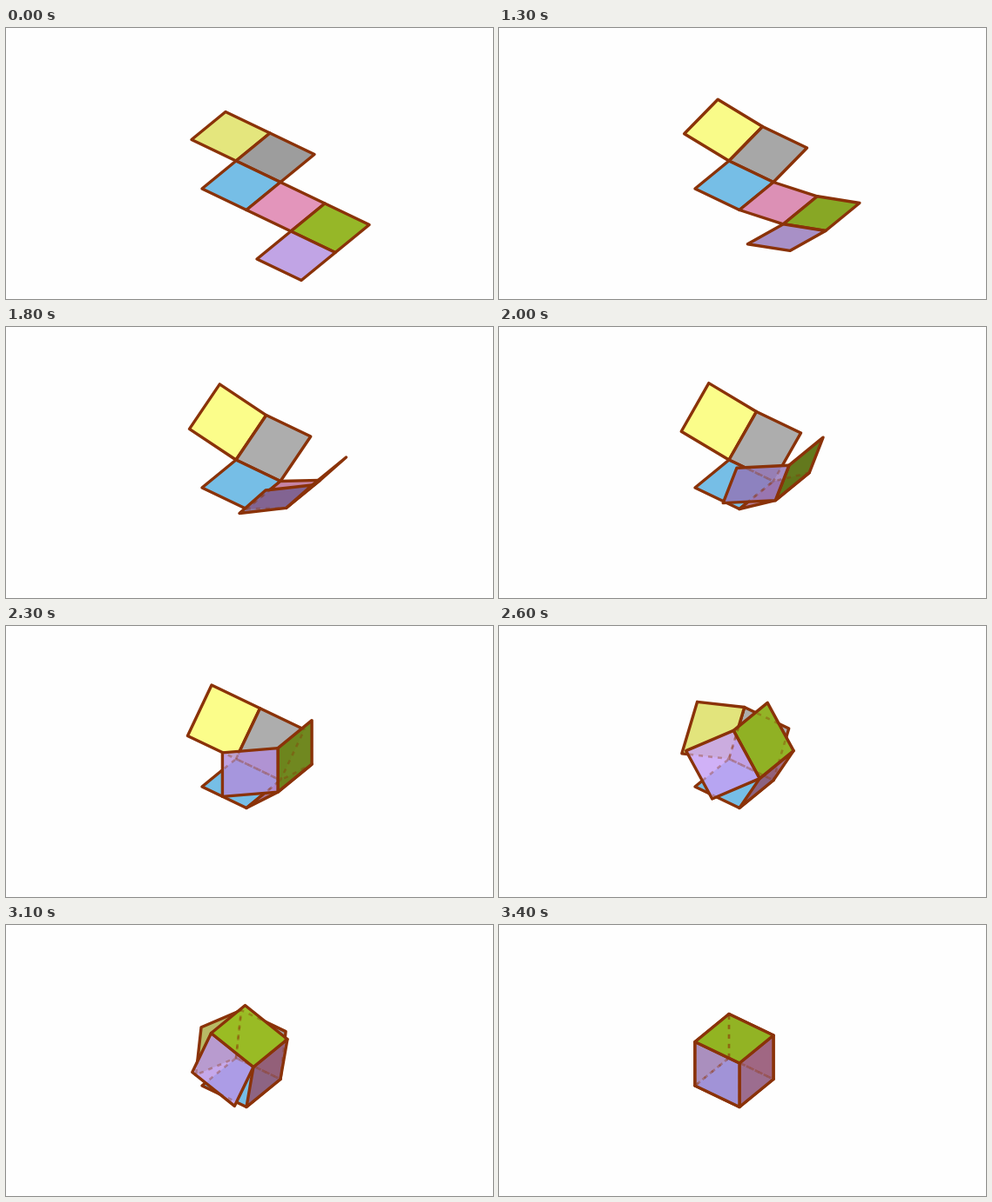
These frames come from a looping animation (559x312 px, 4.9 s). An HTML page with a canvas:

```html
<!DOCTYPE html>
<html lang="en">
<head>
<meta charset="utf-8">
<title>Folding a cube net</title>
<style>
html, body { margin: 0; width: 100%; height: 100%; overflow: hidden; background: #fefefe; }
canvas { display: block; }
</style>
</head>
<body>
<canvas id="stage" width="559" height="312"></canvas>
<script>
const ctx = document.getElementById('stage').getContext('2d');
const LOOP = 4900;
const STEPS = [1300, 1600, 1800, 2000, 2300, 2400, 2600, 2900, 3100, 3400];
const PAPER = '#fefefe', EDGE = '#8a3208';
const U = [1, 0, 0], V = [0, 1, 0], W = [0, 0, 1];
const VIEW = [.477, -.624, .627], LIGHT = [.23, -.45, .5];

const mix = (a, s, b, t) => a.map((x, i) => x * s + b[i] * t);
const add = (a, b) => mix(a, 1, b, 1);
const neg = a => a.map(x => -x);
const dot = (a, b) => a[0] * b[0] + a[1] * b[1] + a[2] * b[2];
const project = ([u, v, w]) => [225 + 51 * u + 39 * v, 185 + 24.5 * u - 32 * v - 50.5 * w];

// Turn a face direction d and its inner normal n about their hinge.
function fold(d, n, angle) {
  const c = Math.cos(angle), s = Math.sin(angle);
  return [mix(d, c, n, s), mix(n, c, d, -s)];
}

function face(origin, side, out, normal, rgb, alpha = 1) {
  const far = add(origin, out);
  const path = new Path2D();
  [origin, add(origin, side), add(far, side), far].forEach(p => path.lineTo(...project(p)));
  path.closePath();
  const centre = add(origin, mix(side, .5, out, .5));
  const seen = dot(normal, VIEW) < 0 ? neg(normal) : normal;
  const shade = Math.min(1.1, Math.max(.64, .5 + dot(seen, LIGHT)));
  const fill = `rgba(${rgb.map(c => Math.min(255, Math.round(c * shade)))},${alpha})`;
  return { path, fill, depth: dot(centre, VIEW) };
}

function buildFaces(angle) {
  const [back, backN] = fold(V, W, angle);
  const [left, leftN] = fold(neg(U), backN, angle);
  const [right, rightN] = fold(U, W, angle);
  const [top, topN] = fold(right, rightN, angle);
  const [front, frontN] = fold(neg(V), topN, angle);
  const corner = add(U, right);
  return [
    face([0, 0, 0], U, V, W, [118, 190, 230]),
    face(V, U, back, backN, [157, 157, 157]),
    face(V, back, left, leftN, [228, 230, 125]),
    face(U, V, right, rightN, [223, 131, 176], .85),
    face(corner, V, top, topN, [146, 181, 32], .96),
    face(corner, top, front, frontN, [180, 145, 224], .82)
  ].sort((a, b) => a.depth - b.depth);
}

function paint(f, color) {
  ctx.fillStyle = color;
  ctx.fill(f.path);
}

function stroke(f, width, dash, alpha) {
  ctx.globalAlpha = alpha;
  ctx.lineWidth = width;
  ctx.setLineDash(dash);
  ctx.stroke(f.path);
  ctx.globalAlpha = 1;
}

function draw(step) {
  ctx.fillStyle = PAPER;
  ctx.fillRect(0, 0, 559, 312);
  ctx.strokeStyle = EDGE;
  ctx.lineJoin = 'round';
  const faces = buildFaces(step * Math.PI / 20);
  faces.forEach((f, i) => {
    const behind = faces.slice(0, i);
    ctx.save();
    ctx.clip(f.path);
    // Replace solid lines behind this face with faint dashes.
    paint(f, PAPER);
    behind.forEach(b => paint(b, b.fill));
    paint(f, f.fill);
    behind.forEach(b => stroke(b, 2.6, [5, 6], .36));
    ctx.restore();
    stroke(f, 3.4, [], 1);
  });
}

const start = performance.now();
function tick() {
  const t = (performance.now() - start) % LOOP;
  draw(STEPS.filter(s => t >= s).length);
  requestAnimationFrame(tick);
}
tick();
</script>
</body>
</html>
```
